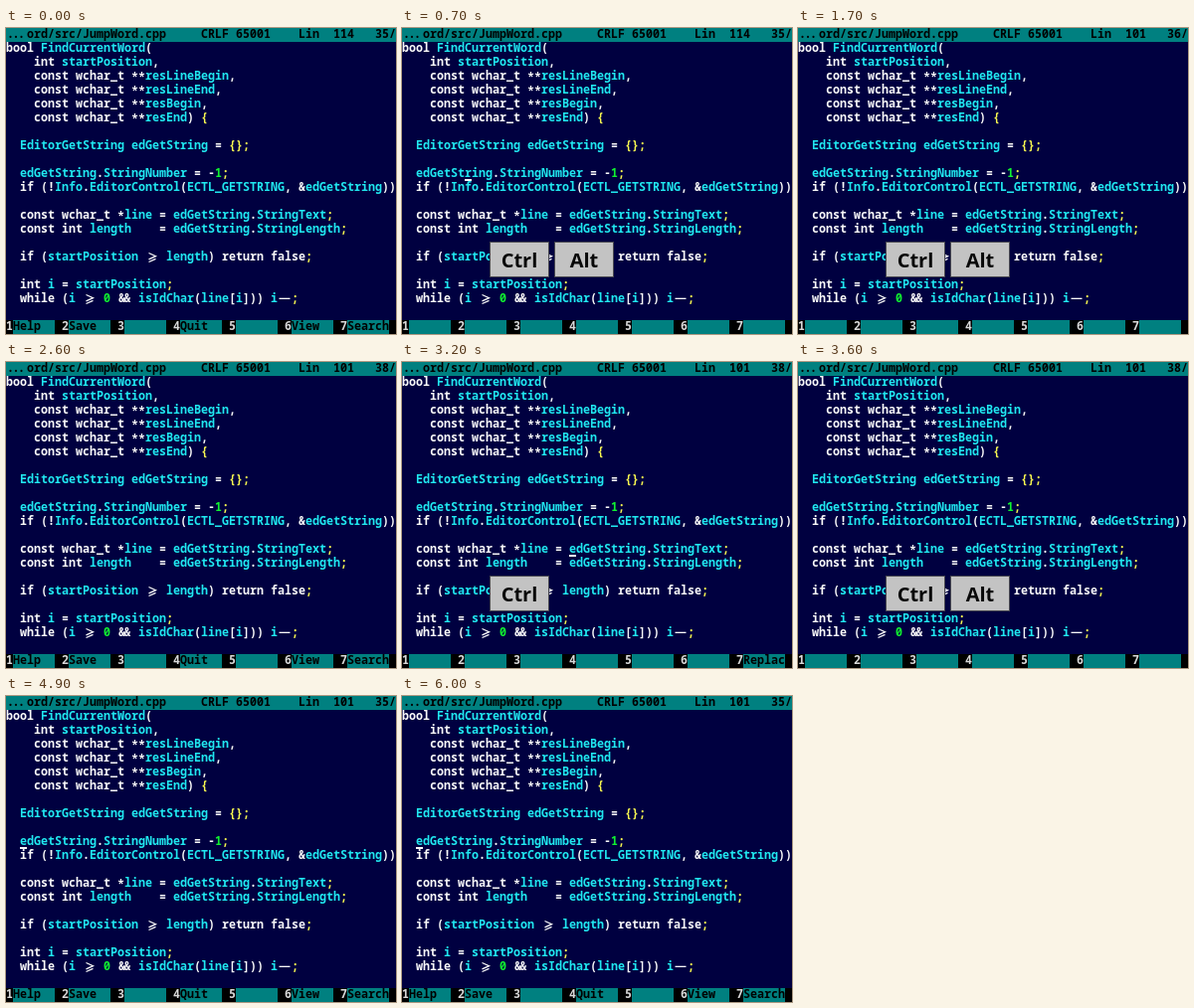
Recreate the animation shown at these times as an HTML page with a canvas. Size 392x308 px, loop 6.1 s.

```html
<!DOCTYPE html>
<html lang="en">
<head>
<meta charset="utf-8">
<title>Word jump in a console editor</title>
<style>
  html, body { margin: 0; width: 100%; height: 100%; overflow: hidden; background: #000040; }
  canvas { display: block; }
</style>
</head>
<body>
<canvas id="stage" width="392" height="308"></canvas>
<script>
const ctx = document.getElementById('stage').getContext('2d');
const CELL = 7, ROW = 14, LOOP = 6100;
const MONO = '600 11.667px "Noto Sans Mono", "DejaVu Sans Mono", monospace';
const TEAL = '#008080', NAVY = '#000040', CYAN = '#20e8f0', WHITE = '#f8f8f8',
      YELLOW = '#f8f850', GREEN = '#10f030';

const code = `bool FindCurrentWord(
    int startPosition,
    const wchar_t **resLineBegin,
    const wchar_t **resLineEnd,
    const wchar_t **resBegin,
    const wchar_t **resEnd) {

  EditorGetString edGetString = {};

  edGetString.StringNumber = -1;
  if (!Info.EditorControl(ECTL_GETSTRING, &edGetString))

  const wchar_t *line = edGetString.StringText;
  const int length    = edGetString.StringLength;

  if (startPosition >= length) return false;

  int i = startPosition;
  while (i >= 0 && isIdChar(line[i])) i--;`.split('\n');

const keywords = /^(bool|int|const|wchar_t|if|return|false|while)$/;

// Cursor stops: cell column, screen row, line number, character code
const start  = { col: 9,  row: 10, line: 35, char: 114 };
const first  = { col: 2,  row: 10, line: 35, char: 101 };
const second = { col: 43, row: 11, line: 36, char: 101 };
const third  = { col: 24, row: 13, line: 38, char: 101 };

const stops  = [[0, start], [1300, second], [2300, third], [3800, second], [4500, first]];
const cursor = [[0, 0], [500, 1], [1000, 0], [1300, 1], [1500, 0], [2000, 1], [2500, 0],
                [3100, 1], [3600, 0], [3800, 1], [4200, 0], [4500, 1], [5600, 0], [6000, 1]];
const held   = [[0, []], [300, ['Ctrl']], [500, ['Ctrl', 'Alt']], [2500, []],
                [3100, ['Ctrl']], [3300, ['Ctrl', 'Alt']], [4900, []]];

const menus = [
  ['Help', 'Save', '', 'Quit', '', 'View', 'Search'],
  ['', '', '', '', '', '', 'Replac'],
  []
];

const at = (track, t) => track.filter(([time]) => time <= t).pop()[1];

function box(color, x, y, w, h) {
  ctx.fillStyle = color;
  ctx.fillRect(x, y, w, h);
}

function text(string, col, row, color, dy = 0, step = CELL) {
  ctx.fillStyle = color;
  [...string].forEach((c, i) => ctx.fillText(c, col * CELL + i * step, row * ROW + 10 + dy));
}

function tokenColor(token) {
  if (/^\d/.test(token)) return GREEN;
  if (/^[;{}]/.test(token)) return YELLOW;
  return /^\w/.test(token) && !keywords.test(token) ? CYAN : WHITE;
}

// Two-cell ">=" whose lower bar runs parallel to the arrow
function drawAtLeast(x, y) {
  ctx.strokeStyle = WHITE;
  ctx.lineWidth = 1.3;
  ctx.stroke(new Path2D(`M${x + 3.5} ${y + 2.5}l7 3.2l-7 3.2m0 2.6l7 -3.2`));
}

function drawToken(token, col, row) {
  const x = col * CELL, y = row * ROW;
  if (token === '--') box(WHITE, x + 1.5, y + 5.7, 11, 1.3);
  else if (token === '>=') drawAtLeast(x, y);
  else if (token === '&&') text(token, col + 0.15, row, WHITE, 0, 5.5);
  else text(token, col, row, tokenColor(token), token === '*' ? 2 : 0);
}

function drawCode() {
  code.forEach((line, i) => {
    for (const m of line.matchAll(/\w+|>=|--|&&|[^\w\s]/g)) drawToken(m[0], m.index, i + 1);
  });
}

function drawHeader(stop) {
  box(TEAL, 0, 0, 392, ROW);
  text('...', 0.15, 0, '#000', 0, 5.5);
  text('ord/src/JumpWord.cpp', 3, 0, '#000');
  text('CRLF 65001', 28, 0, '#000');
  text('Lin', 42, 0, '#000');
  text(String(stop.char), 47, 0, '#000');
  text(stop.line + '/', 53, 0, '#000');
}

function drawMenu(labels) {
  const row = 21;
  box('#000', 0, row * ROW, 392, ROW);
  for (let i = 0; i < 7; i++) {
    const col = i * 8;
    box(TEAL, (col + 1) * CELL, row * ROW, 6 * CELL, ROW);
    text(String(i + 1), col, row, '#d8d8d8');
    text(labels[i] || '', col + 1, row, '#000');
  }
}

function drawKeys(keys) {
  ctx.save();
  ctx.font = '700 20px "Open Sans", "Noto Sans", sans-serif';
  ctx.textAlign = 'center';
  keys.forEach((key, i) => {
    const x = 88 + i * 65;
    box('#484850', x, 215, 60, 36);
    box('#c3c3c3', x + 1, 216, 58, 34);
    ctx.fillStyle = '#080808';
    ctx.fillText(key, x + 30, 241);
  });
  ctx.restore();
}

function draw(now) {
  const t = now % LOOP, stop = at(stops, t), keys = at(held, t);
  ctx.font = MONO;
  box(NAVY, 0, 0, 392, 308);
  drawHeader(stop);
  drawCode();
  drawMenu(menus[keys.length]);
  if (at(cursor, t)) box(WHITE, stop.col * CELL, stop.row * ROW + 12, CELL, 2);
  drawKeys(keys);
}

const begin = performance.now();
function tick() {
  draw(performance.now() - begin);
  requestAnimationFrame(tick);
}
tick();
</script>
</body>
</html>
```
